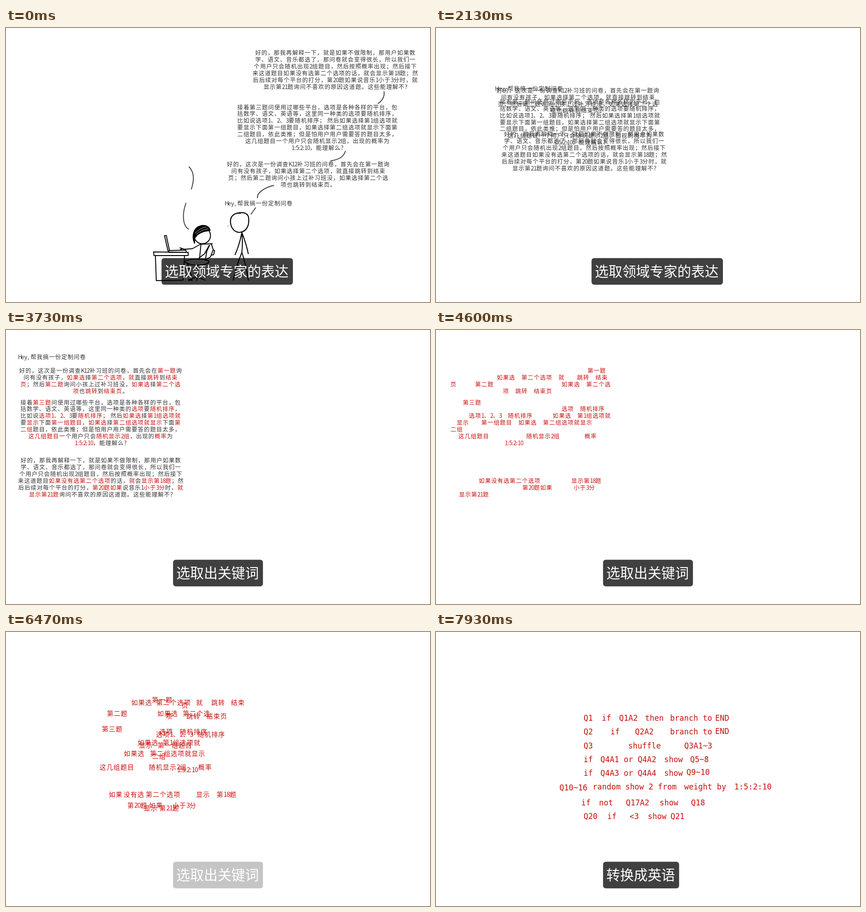
An HTML page that plays this animation: 931x602 px, repeating every 8000 ms.

```html
<!DOCTYPE html>
<html lang="zh">
<head>
<meta charset="utf-8">
<style>
  html, body { margin: 0; width: 100%; height: 100%; overflow: hidden; background: #fff; }
  svg { display: block; width: 931px; height: 602px; }
  .hand { font: 500 12.5px "Noto Sans CJK SC", "Noto Sans CJK", sans-serif; fill: #333; }
  .code { font: 17px "DejaVu Sans Mono", monospace; fill: #c8100c; }
  .cap { font: 300 30.2px "Noto Sans CJK SC", "Noto Sans CJK", sans-serif; fill: #fff; }
  .ink { fill: none; stroke: #000; stroke-width: 2; stroke-linecap: round; stroke-linejoin: round; }
  .tail { stroke: #444; }
</style>
</head>
<body>
<svg id="stage" viewBox="0 0 931 602">
  <g id="left" class="ink">
    <path class="tail" d="M402 305C413 317 414 332 407 354M395 385C387 407 387 434 401 442"/>
    <!-- desk and laptop -->
    <path d="M324 492L400 493V500L325 500ZM328 500L330 555L389 554L392 500"/>
    <path d="M348 456L356 491L359 489L352 456ZM358 489L395 488L396 493L358 493"/>
    <!-- sitter -->
    <circle cx="431" cy="456" r="18"/>
    <path fill="#000" d="M414 473C407 458 412 439 426 435C438 431 447 437 448 445C434 446 420 451 414 463Z"/>
    <path stroke="#fff" stroke-width=".8" d="M415 451Q425 440 440 437M418 453Q428 444 444 441"/>
    <path d="M382 483L391 486L409 485L427 475L453 474M383 487L387 485M428 476L425 506M447 477L441 490L438 508M446 478L436 496L424 505"/>
    <!-- chair -->
    <path d="M451 475L455 487L449 503L440 508M455 488L458 489L456 498L451 499"/>
    <path d="M392 514C398 506 440 506 446 513C444 523 406 524 392 514ZM398 516L408 548M419 521V546M401 555L419 546L437 554M419 546V555M401 552L409 555"/>
  </g>
  <g id="right" class="ink">
    <path class="tail" d="M830 140C832 149 827 159 817 166M745 271C741 284 730 289 713 292M588 346C568 350 551 362 552 373M548 395L538 409"/>
    <path stroke-width="2.2" d="M515 407C498 405 492 417 493 427C494 441 503 449 513 449C526 448 534 437 533 420C533 408 524 403 507 407"/>
    <path d="M518 449Q520 472 518 493M518 449Q513 475 503 498M518 450Q527 472 532 496M518 493Q505 525 499 554M518 493Q528 525 532 554"/>
    <path stroke-width="1.5" d="M487.5 435V435.1"/>
  </g>
</svg>
<script>
const stage = document.getElementById('stage');
const left = document.getElementById('left');
const right = document.getElementById('right');
const ROWS = [188, 218, 249, 279, 309, 339, 374, 404];
const PITCH = 13.55;

// [word@row,x] marks a key word and where it ends up; without @ it is dropped
const paras = [
  { cx: 101, y: 59, shift: [454, 326], lines: ['Hey, 帮我搞一份定制问卷'] },
  { cx: 208, y: 89.5, shift: [456, 210], lines: [
    '好的，这次是一份调查K12补习班的问卷，首先会在[第一题@0,312]询',
    '问有没有孩子，[如果选@0,370]择[第二个选项@0,425]，[就@0,517]直接[跳转@0,545]到[结束@0,590]',
    '[页@0,622]；然后[第二题@1,312]询问小孩上过补习班没，[如果选@1,370]择[第二个选@1,427]',
    '[项@1,487]也[跳转@1,545]到[结束页@1,591]。'] },
  { cx: 208, y: 159, shift: [476, 15], lines: [
    '接着[第三题@2,312]问使用过哪些平台，选项是各种各样的平台，包',
    '括数学、语文、英语等，这里同一种类的[选项@2,377]要[随机排序@2,425]，',
    '比如说[选项1、2、3@2,501]要[随机排序@2,596]； 然后[如果选@3,311]择[第1组选项就@3,367]',
    '要[显示@3,457]下面[第一组题目@3,489]，[如果选@4,311]择[第二组选项就显示@4,370]下面[第]',
    '[二组@4,514]题目，依此类推；但是怕用户用户需要答的题目太多，',
    '[这几组题目@5,310]一个用户只会[随机显示2组@5,391]，出现的[概率@5,486]为',
    '[1:5:2:10@5,526]，能理解么?'] },
  { cx: 208.5, y: 286.7, shift: [515, -232], lines: [
    '好的，那我再解释一下，就是如果不做限制，那用户如果数',
    '学、语文、音乐都选了，那问卷就会变得很长，所以我们一',
    '个用户只会随机出现2组题目，然后按照概率出现；然后接下',
    '来这道题目[如果@6,314][没有选@6,350][第二个选项@6,404]的话，[就]会[显示@6,498][第18题@6,555]；然',
    '后后续对每个平台的打分，[第20题@7,318][如果@7,371]说音乐1[小于3分@7,408]时，[就]',
    '[显示@7,471][第21题@7,510]询问不喜欢的原因这道题。这些能理解不?'] }
];

// word@x[,dy] per row
const code = [
  'Q1@325|if@365|Q1A2@403|then@460|branch to@515|END@614',
  'Q2@325|if@384|Q2A2@438|branch to@515|END@614,-1',
  'Q3@325|shuffle@423|Q3A1~3@546',
  'if@325|Q4A1 or Q4A2@362|show@502|Q5~8@559',
  'if@325|Q4A3 or Q4A4@362|show@502|Q9~10@551,-2',
  'Q10~16@272,2|random show 2 from@345|weight by@546|1:5:2:10@656',
  'if@320|not@359|Q17A2@418|show@492|Q18@561',
  'Q20@325|if@377|<3@426|show@466|Q21@516'
];

function add(parent, tag, attrs, content = '') {
  const el = document.createElementNS('http://www.w3.org/2000/svg', tag);
  for (const k in attrs) el.setAttribute(k, attrs[k]);
  el.textContent = content;
  return parent.appendChild(el);
}

const advance = ch => ch > '\u00ff' ? PITCH : /[:, ]/.test(ch) ? 3.4 : /[A-Za-z]/.test(ch) ? 7 : 6;
const width = s => [...s].reduce((w, ch) => w + advance(ch), 0);

function write(parent, s, x, y) {
  const xs = [...s].map(ch => { const at = x; x += advance(ch); return at.toFixed(2); });
  return add(parent, 'text', { class: 'hand', x: xs.join(' '), y: y + 4.6 }, s);
}

const keys = [];
for (const para of paras) {
  para.g = add(stage, 'g');
  para.lines.forEach((line, i) => {
    const parts = line.match(/\[.+?\]|[^\[]+/g).map(p => {
      const m = p.match(/^\[(.+?)(?:@(\d),(\d+))?\]$/);
      return { s: m ? m[1] : p, key: !!m, to: m && m[2] && [+m[3], ROWS[m[2]]] };
    });
    const y = para.y + i * 14.85;
    let x = para.cx - width(parts.map(p => p.s).join('')) / 2;
    for (const { s, key, to } of parts) {
      if (key) keys.push({ el: write(stage, s, 0, 0), x, y, to, para });
      else write(para.g, s, x, y);
      x += width(s);
    }
  });
}

const english = add(stage, 'g', { class: 'code' });
code.forEach((row, i) => row.split('|').forEach(item => {
  const [s, at] = item.split('@');
  const [x, dy = 0] = at.split(',').map(Number);
  add(english, 'text', { x: x - 1, y: ROWS[i] + 7 + dy }, s);
}));

function caption(s, x, y, w) {
  const g = add(stage, 'g');
  add(g, 'rect', { x, y, width: w, height: 58.5, rx: 6, fill: '#000', 'fill-opacity': .75 });
  add(g, 'text', { class: 'cap', x: x + 7.3, y: y + 40.5 }, s);
  return g;
}
const caps = [
  caption('选取领域专家的表达', 341.5, 505.5, 288.5),
  caption('选取出关键词', 366.8, 504.7, 197.4),
  caption('转换成英语', 366.8, 504.7, 167)
];

const ramp = (t, a, b) => Math.min(1, Math.max(0, (t - a) / (b - a)));
const glide = (t, a) => (1 - Math.cos(Math.PI * ramp(t, a, a + 960))) / 2;
const mix = (a, b, k) => a + (b - a) * k;
const fade = (el, o) => el.setAttribute('opacity', o);

function draw(t) {
  const gather = 1 - glide(t, 1475), sort = glide(t, 5930);
  const plain = 1 - ramp(t, 4270, 4600), swap = ramp(t, 7400, 7670);
  const red = ramp(t, 3200, 3470);
  const fill = `rgb(${mix(51, 200, red)},${mix(51, 16, red)},${mix(51, 12, red)})`;

  fade(left, t < 400 ? 1 : 0);
  fade(right, 1 - ramp(t, 1475, 1790));
  for (const { g, shift: [dx, dy] } of paras) {
    g.setAttribute('transform', `translate(${dx * gather} ${dy * gather})`);
    fade(g, plain);
  }
  for (const { el, x, y, to, para: { shift } } of keys) {
    const [tx, ty] = to || [x, y];
    const px = mix(x, tx, sort) + shift[0] * gather;
    const py = mix(y, ty, sort) + shift[1] * gather;
    el.setAttribute('transform', `translate(${px} ${py}) scale(${to ? mix(1, 1.21, sort) : 1})`);
    el.style.fill = fill;
    fade(el, to ? 1 - swap : plain);
  }
  fade(english, swap);
  fade(caps[0], 1 - ramp(t, 2940, 3070));
  fade(caps[1], ramp(t, 3200, 3400) - ramp(t, 6380, 6510));
  fade(caps[2], ramp(t, 7400, 7600));
}

const start = performance.now();
function tick() {
  draw((performance.now() - start) % 8000);
  requestAnimationFrame(tick);
}
tick();
</script>
</body>
</html>
```
